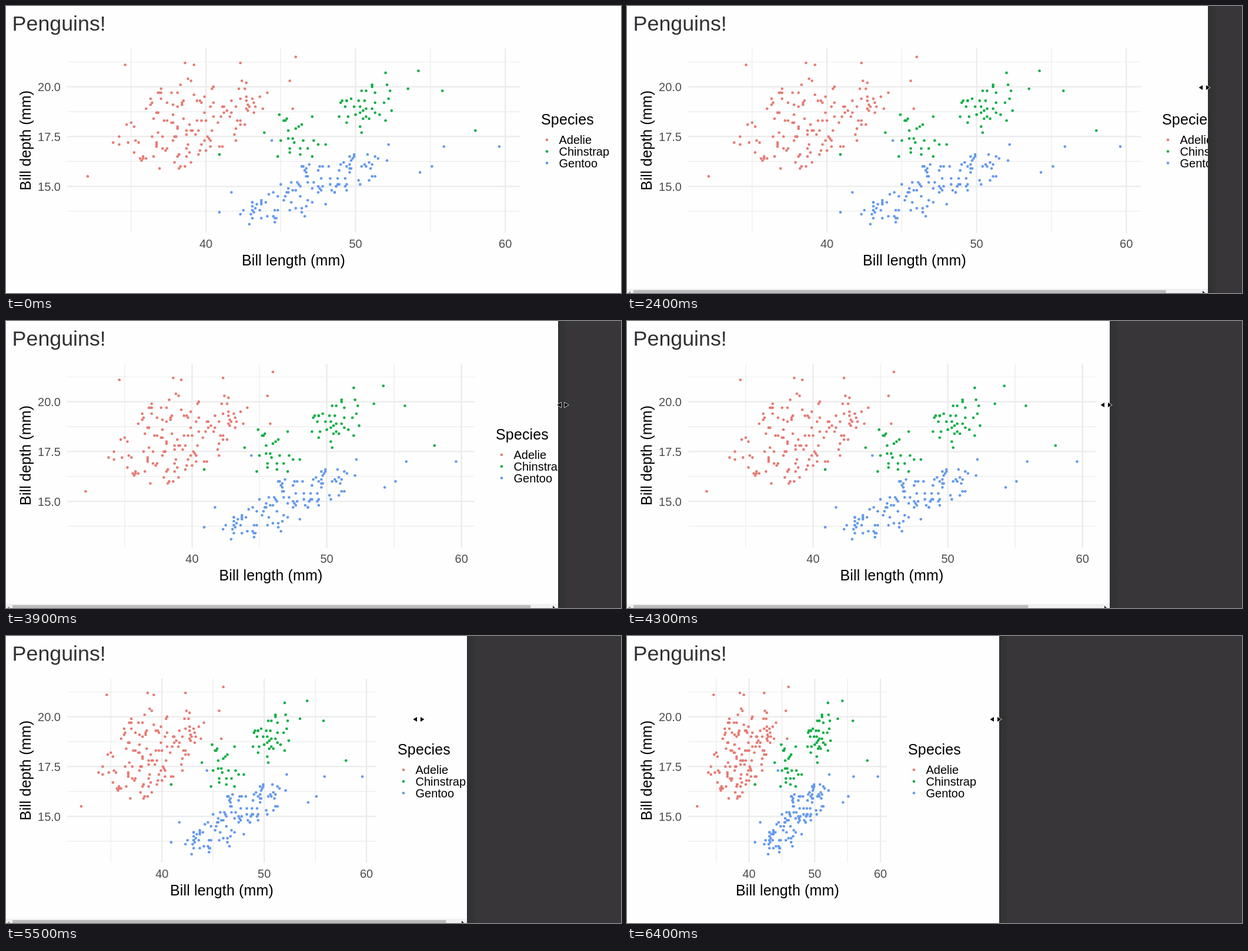
An HTML page that plays this animation: 1046x489 px, repeating every 7900 ms.

```html
<!DOCTYPE html>
<html lang="en">
<head>
<meta charset="utf-8">
<title>Penguins!</title>
<style>
  html, body { margin: 0; width: 100%; height: 100%; overflow: hidden; background: #fefefe; }
  svg { display: block; width: 100%; height: 100%; font-family: "Liberation Sans", Arial, sans-serif; }
  .title { font-size: 35.8px; fill: #313134; }
  .head { font-size: 25px; letter-spacing: .15px; fill: #000; }
  .label { font-size: 20px; fill: #000; }
  .tick { font-size: 20px; fill: #4d4d4d; }
  .mid { text-anchor: middle; }
  .end { text-anchor: end; }
</style>
</head>
<body>
<svg viewBox="0 0 1046 489">
  <defs>
    <linearGradient id="shade">
      <stop offset="0" stop-color="#2f3132"/>
      <stop offset="1" stop-color="#363537"/>
    </linearGradient>
  </defs>
  <rect width="1046" height="489" fill="#fefefe"/>
  <text class="title" x="10.6" y="42">Penguins!</text>
  <g id="plot"></g>
  <g id="bar">
    <rect id="track" y="482" height="7" fill="#f0f0f0"/>
    <rect id="thumb" x="11" y="484" height="5" fill="#bcbcbc"/>
    <path d="M2 489l4-3v6z" fill="#8f8f8f"/>
    <path id="arrow" d="M-5 489l-4-4v8z" fill="#222"/>
  </g>
  <g id="dark">
    <rect width="1100" height="489" fill="#383638"/>
    <rect width="15" height="489" fill="url(#shade)"/>
  </g>
  <path id="cursor" d="M-9.5 0l6.5-4v8zM9.5 0l-6.5-4v8z" fill="#000" stroke="#fff" stroke-width="1.3" paint-order="stroke"/>
</svg>
<script>
const $ = id => document.getElementById(id);
const LOOP = 7900, TICK = 100, FULL = 1065;
const LEFT = 104, TOP = 72.5, BOTTOM = 386, MARGIN = 191;
const X0 = 30.725, X_SPAN = 30.25, Y1 = 21.92, Y_SPAN = 9.24;

// The divider jumps to `from`, eases to `to`, and the plot refits at `refit`.
// `lead` is how far the pointer starts ahead of the divider.
const DRAGS = [
  { start: 2000, end: 2400, from: 1027, to: 988, lead: 0, y: 139, refit: 3000 },
  { start: 3900, end: 4200, from: 939, to: 821, lead: 14, y: 143, refit: 4800 },
  { start: 5500, end: 5800, from: 784, to: 633, lead: -76, y: 142, refit: 6400 }
];

// A cloud is a sheared ellipse filled with random points; strays lie outside it.
const SPECIES = [
  { name: "Adelie", color: "#e67b73",
    clouds: [{ n: 142, x: 38.8, y: 18.2, rx: 5.1, ry: 2.25, slope: .15 }],
    strays: [[46, 21.5], [45.6, 20.3], [45.8, 18.9], [44.1, 19.7], [42.3, 21.2],
      [39.2, 21.1], [38.6, 21.2], [34.6, 21.1], [32.1, 15.5]] },
  { name: "Chinstrap", color: "#0bae43",
    clouds: [
      { n: 37, x: 50.7, y: 18.95, rx: 2.1, ry: 1.2, slope: .2 },
      { n: 25, x: 46, y: 17.6, rx: 2.3, ry: 1.3, slope: 0 }],
    strays: [[58, 17.8], [55.8, 19.8], [54.2, 20.8], [53.5, 19.9], [52, 20.7], [40.9, 16.6]] },
  { name: "Gentoo", color: "#6499ec",
    clouds: [{ n: 114, x: 47.2, y: 14.95, rx: 4.9, ry: 1.3, slope: .28 }],
    strays: [[59.6, 17], [55.9, 17], [55.1, 16], [54.3, 15.7], [52.2, 17.1],
      [44.4, 17.3], [42.9, 13.1], [41.7, 14.7], [40.9, 13.7]] }
];

let seed = 20;
function random() {
  seed = (seed * 16807) % 2147483647;
  return seed / 2147483647;
}
const round = v => Math.round(v * 10) / 10;

function fill({ n, x, y, rx, ry, slope }) {
  return Array.from({ length: n }, () => {
    const a = 2 * Math.PI * random(), r = random() ** .55;
    const dx = rx * r * Math.cos(a);
    return [round(x + dx), round(y + slope * dx + ry * r * Math.sin(a))];
  });
}
for (const s of SPECIES) s.points = [...s.strays, ...s.clouds.flatMap(fill)];

const text = (cls, x, y, s, more = "") => `<text class="${cls}" x="${x}" y="${y}" ${more}>${s}</text>`;
const line = (d, w) => `<path d="${d}" stroke="#ebebeb" stroke-width="${w}"/>`;
const dot = (x, y, c) => `<circle cx="${x.toFixed(2)}" cy="${y.toFixed(2)}" r="2.3" fill="${c}"/>`;

function plot(width) {
  const right = width - MARGIN;
  const px = v => LEFT + (v - X0) / X_SPAN * (right - LEFT);
  const py = v => TOP + (Y1 - v) / Y_SPAN * (BOTTOM - TOP);
  const vline = (v, w) => line(`M${px(v)} ${TOP}V${BOTTOM}`, w);
  const hline = (v, w) => line(`M${LEFT} ${py(v)}H${right}`, w);
  let out = "";

  for (let v = 35; v < 60; v += 10) out += vline(v, 1.2);
  for (let v = 13.75; v < 22; v += 2.5) out += hline(v, 1.2);
  for (let v = 40; v <= 60; v += 10) out += vline(v, 2.3) + text("tick mid", px(v), 412, v);
  for (let v = 15; v <= 20; v += 2.5) out += hline(v, 2.3) + text("tick end", 93, py(v) + 7.3, v.toFixed(1));

  out += text("head mid", (LEFT + right) / 2, 442, "Bill length (mm)");
  out += text("head mid", 0, 0, "Bill depth (mm)", 'transform="translate(41.5 229) rotate(-90)"');
  out += text("head", right + 36, 202, "Species");

  SPECIES.forEach(({ name, color, points }, i) => {
    const y = 228 + 19.8 * i;
    for (const [a, b] of points) out += dot(px(a), py(b), color);
    out += dot(right + 46, y, color) + text("label", right + 66.5, y + 7, name);
  });
  $("plot").innerHTML = out;
}

function stateAt(t) {
  const i = DRAGS.findLastIndex(d => d.start <= t);
  if (i < 0) return { edge: FULL, width: FULL, x: -50, y: 0 };
  const { start, end, from, to, lead, y, refit } = DRAGS[i];
  const rest = (1 - Math.min(1, (t - start) / (end - start))) ** 3;
  const edge = to + (from - to) * rest;
  const before = i ? DRAGS[i - 1].to : FULL;
  return { edge, width: t < refit ? before : to, x: edge - 6 + lead * rest, y };
}

let plotted;
function draw(ms) {
  const t = Math.floor(ms % LOOP / TICK) * TICK;
  const { edge, width, x, y } = stateAt(t);
  if (width !== plotted) plot(plotted = width);

  $("bar").style.display = edge < width ? "" : "none";
  $("track").setAttribute("width", edge);
  $("thumb").setAttribute("width", edge * (edge - 22) / (width - 11));
  $("arrow").setAttribute("transform", `translate(${edge})`);
  $("dark").setAttribute("transform", `translate(${edge})`);
  $("cursor").setAttribute("transform", `translate(${x} ${y})`);
}

const start = performance.now();
function tick() {
  draw(performance.now() - start);
  requestAnimationFrame(tick);
}
tick();
</script>
</body>
</html>
```
